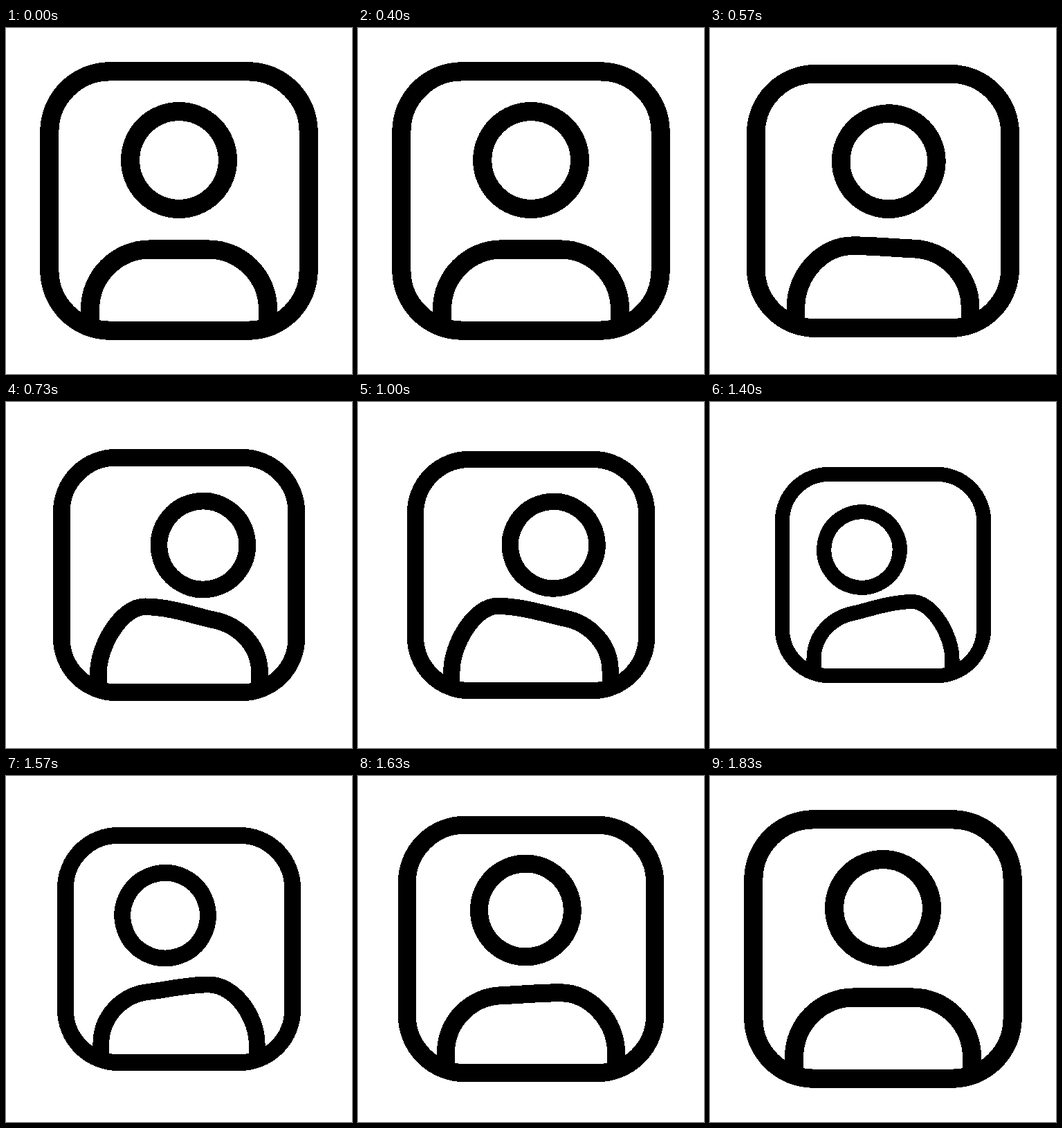
Recreate the animation shown at these times as an HTML page. Size 500 px wide and 500 px high, loop 1.93 s.

```html
<!DOCTYPE html>
<html lang="en">
<head>
<meta charset="utf-8">
<title>Portrait icon</title>
<style>
  html, body { margin: 0; width: 100%; height: 100%; overflow: hidden; background: #fff; }
  svg { display: block; width: 100%; height: 100%; }
</style>
</head>
<body>
<svg viewBox="-250 -250 500 500" shape-rendering="crispEdges">
  <g id="icon" fill="none" stroke="#000" stroke-width="27.2">
    <rect x="-187.2" y="-187.2" width="374.4" height="374.4" rx="87.2"/>
    <circle id="head" cy="-59" r="70.4"/>
    <path id="body"/>
  </g>
</svg>
<script>
const LOOP = 1930, FPS = 30;
const TILT = 36.2, PIVOT_Y = 10.5; // the head swings around a point below it
const [icon, head, body] = ['icon', 'head', 'body'].map(id => document.getElementById(id));

// lean: -1 left to 1 right; lift: how far the shoulders have left their level pose
const rest = { scale: 1, lean: 0, lift: 0 };
const right = { scale: 0.9, lean: 1, lift: 1 };
const left = { scale: 0.778, lean: -0.95, lift: 1 };
const moves = [
  { start: 367, end: 900, from: rest, to: right, ease: bezier(0.75, 0.15) },
  { start: 900, end: 1400, from: right, to: left, ease: bezier(0.58, 0.1) },
  { start: 1433, end: 1833, from: left, to: rest, ease: bezier(0.5, 0.1) }
];

// Same as cubic-bezier(x1, 0, x2, 1)
function bezier(x1, x2) {
  const at = (a, b, u) => 3 * (1 - u) ** 2 * u * a + 3 * (1 - u) * u * u * b + u ** 3;
  return x => {
    if (x <= 0 || x >= 1) return x <= 0 ? 0 : 1;
    let lo = 0, hi = 1;
    for (let i = 0; i < 24; i++) {
      const mid = (lo + hi) / 2;
      if (at(x1, x2, mid) < x) lo = mid; else hi = mid;
    }
    return at(0, 1, lo);
  };
}

// Curve points of one side (-1 left, 1 right), from the arm inwards
function shoulder(side, lean, lift) {
  const up = (lift - side * lean) / 2, down = lift - up;
  const y = 70 - 21 * up + 1.5 * down;
  return [
    [side * 128.5, 156.5],
    [side * 128.5, 109 + 4 * up],
    [side * (90 + 2 * lift), y + 7.5 * down],
    [side * (42 + 13 * lift), y],
    [side * (14 + 16 * down), y - 5.5 * down]
  ];
}

function draw(now) {
  const time = Math.floor((now % LOOP + 4) * FPS / 1000) * 1000 / FPS;
  const { start, end, from, to, ease } = moves.findLast(m => time >= m.start) || moves[0];
  const p = ease((time - start) / (end - start));
  const [scale, lean, lift] = ['scale', 'lean', 'lift'].map(k => from[k] + (to[k] - from[k]) * p);
  const [arm, ...curve] = [...shoulder(-1, lean, lift), ...shoulder(1, lean, lift).reverse()];

  icon.setAttribute('transform', `scale(${scale})`);
  head.setAttribute('transform', `rotate(${TILT * lean} 0 ${PIVOT_Y})`);
  body.setAttribute('d', `M${arm[0]} 180L${arm}C${curve.join(' ')}V180`);
}

let began;
function tick(now) {
  began ??= now;
  draw(now - began);
  requestAnimationFrame(tick);
}
draw(0);
requestAnimationFrame(tick);
</script>
</body>
</html>
```
